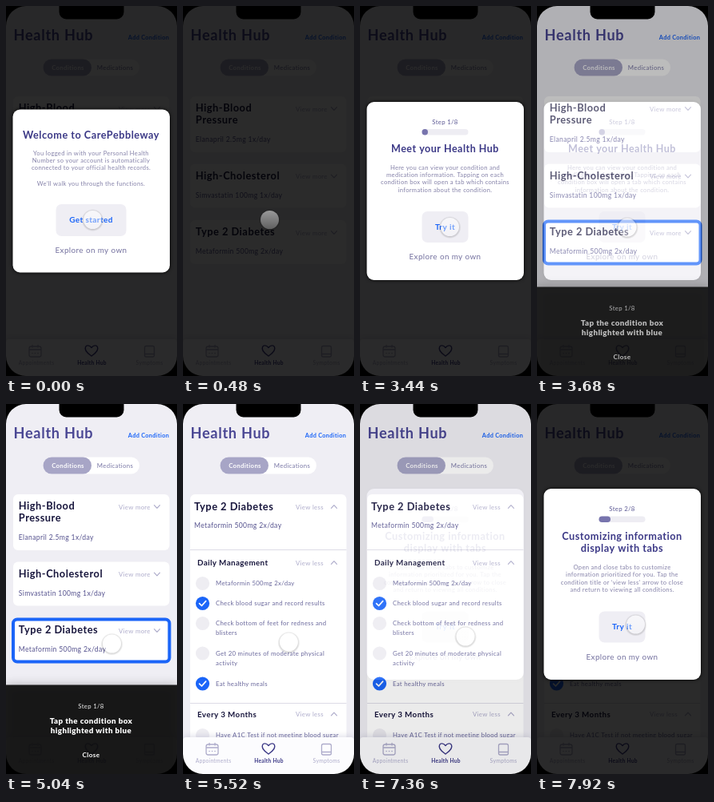
Animation of 214x463 px, one loop 8000 ms. Source, as an HTML page with a canvas:

```html
<!DOCTYPE html>
<html lang="en">
<head>
<meta charset="utf-8">
<title>Health Hub walkthrough</title>
<style>
html, body { margin: 0; width: 100%; height: 100%; overflow: hidden; background: #000; }
canvas { display: block; width: 214px; height: 463px; }
</style>
</head>
<body>
<canvas id="stage"></canvas>
<script>
const W = 214, H = 463, LOOP = 8000;
const ratio = window.devicePixelRatio || 1;
const INK = '#3b3886', NAVY = '#17153c', SOFT = '#8582a9', LILAC = '#aeaccb';
const DOSE = '#56538f', BLUE = '#1b65f8';
let g;

function setUp(canvas) {
  canvas.width = W * ratio;
  canvas.height = H * ratio;
  const c = canvas.getContext('2d');
  c.scale(ratio, ratio);
  return c;
}

function box(x, y, w, h, r, fill) {
  g.beginPath();
  g.roundRect(x, y, w, h, r);
  g.fillStyle = fill;
  g.fill();
}

function shadowed(blur, color, draw) {
  g.save();
  g.shadowColor = color;
  g.shadowBlur = blur * ratio;
  draw();
  g.restore();
}

function disc(x, y, r, fill) {
  g.beginPath();
  g.arc(x, y, r, 0, Math.PI * 2);
  g.fillStyle = fill;
  g.fill();
}

function line(points, color, width) {
  g.beginPath();
  points.forEach(([x, y]) => g.lineTo(x, y));
  g.strokeStyle = color;
  g.lineWidth = width;
  g.lineCap = g.lineJoin = 'round';
  g.stroke();
}

function text(str, x, y, size, color, weight = 400, align = 'left') {
  g.font = `${weight} ${size}px Lato, sans-serif`;
  g.letterSpacing = size * 0.04 + 'px';
  g.textAlign = align;
  g.fillStyle = color;
  g.fillText(str, x, y);
}

const centred = (str, y, size, color, weight) => text(str, 106.5, y, size, color, weight, 'center');

function toggleLink(label, y, up) {
  text(label, 141, y, 7.8, LILAC);
  const d = up ? -1.8 : 1.8;
  line([[185.5, y - 3 - d], [189, y - 3 + d], [192.5, y - 3 - d]], LILAC, 1.2);
}

// Screens

function header() {
  g.fillStyle = '#efeef4';
  g.fillRect(0, 0, W, H);
  text('Health Hub', 9.5, 42.5, 18.1, '#4a4794', 700);
  text('Add Condition', 152.8, 42, 7.4, BLUE, 700);
  box(46.5, 66.5, 120.5, 21, 10.5, '#fff');
  box(46.5, 66.5, 60.5, 21, 10.5, '#a7a5c6');
  text('Conditions', 77.5, 80, 7.8, '#fff', 700, 'center');
  text('Medications', 136.5, 80, 7.8, '#7977a5', 400, 'center');
}

function tabBar() {
  shadowed(10, 'rgba(60,58,110,.22)', () => box(0, 417, W, 50, 4, '#fcfcfe'));
  g.strokeStyle = LILAC;
  g.lineWidth = 1.3;
  g.beginPath();
  g.roundRect(29, 426, 15, 13, 2.5);
  g.moveTo(29, 430); g.lineTo(44, 430);
  g.moveTo(33, 424.5); g.lineTo(33, 427);
  g.moveTo(40, 424.5); g.lineTo(40, 427);
  g.roundRect(173.5, 425.5, 12, 13.5, 2);
  g.moveTo(174, 435.5); g.lineTo(185, 435.5);
  g.stroke();
  for (const x of [33, 36.5, 40]) disc(x, 434.5, 0.8, LILAC);

  g.strokeStyle = INK;
  g.lineWidth = 1.4;
  g.beginPath();
  g.moveTo(107, 438);
  g.bezierCurveTo(93, 429, 101, 420.5, 107, 427.5);
  g.bezierCurveTo(113, 420.5, 121, 429, 107, 438);
  g.stroke();
  text('Appointments', 38, 449, 6.7, LILAC, 400, 'center');
  text('Health Hub', 107.5, 449, 6.6, INK, 700, 'center');
  text('Symptoms', 179.5, 449, 6.9, LILAC, 400, 'center');
}

function conditionCard(y, h, title, dose) {
  box(9, y, 195.5, h, 6, '#fff');
  title.forEach((row, i) => text(row, 15.8, y + 19 + i * 15, 12.8, NAVY, 700));
  text(dose, 15.8, y + h - 13, 8.6, DOSE);
  toggleLink('View more', y + 18.5, false);
}

function conditionList() {
  header();
  conditionCard(113, 70, ['High-Blood', 'Pressure'], 'Elanapril 2.5mg 1x/day');
  conditionCard(197.5, 55, ['High-Cholesterol'], 'Simvastatin 100mg 1x/day');
  conditionCard(268, 55, ['Type 2 Diabetes'], 'Metaformin 500mg 2x/day');
  tabBar();
}

function task() {
  conditionList();
  g.strokeStyle = BLUE;
  g.lineWidth = 4;
  g.beginPath();
  g.roundRect(9, 269.5, 195.5, 53, 5);
  g.stroke();
  shadowed(12, 'rgba(0,0,0,.3)', () => {
    g.fillStyle = 'rgba(14,14,14,.94)';
    g.fillRect(0, 351.5, W, H);
  });
  centred('Step 1/8', 381, 7.8, '#eee');
  centred('Tap the condition box', 399.5, 9.8, '#fff', 900);
  centred('highlighted with blue', 411.5, 9.8, '#fff', 900);
  centred('Close', 441.5, 8.2, '#fff', 700);
}

function todo(y, rows, done) {
  disc(24.5, y, 8.6, done ? BLUE : '#eeedf2');
  if (done) line([[20.5, y + 0.2], [23.4, y + 3], [28.6, y - 2.9]], '#fff', 1.7);
  rows.forEach((row, i) => text(row, 41, y + 2.5 + i * 12, 7.75, '#6a689c'));
}

function expanded() {
  header();
  box(9, 113, 195.5, 320, 6, '#fff');
  text('Type 2 Diabetes', 14, 132.5, 12.8, NAVY, 700);
  toggleLink('View less', 131.5, true);
  text('Metaformin 500mg 2x/day', 14, 154.5, 8.6, DOSE);
  for (const y of [182, 374]) {
    g.fillStyle = '#dddce6';
    g.fillRect(9, y, 195.5, 1);
  }
  text('Daily Management', 18, 202, 9.8, NAVY, 700);
  toggleLink('View less', 201.5, true);
  todo(224.5, ['Metaformin 500mg 2x/day']);
  todo(249.5, ['Check blood sugar and record results'], true);
  todo(274.5, ['Check bottom of feet for redness and', 'blisters']);
  todo(312, ['Get 20 minutes of moderate physical', 'activity']);
  todo(350, ['Eat healthy meals'], true);
  text('Every 3 Months', 18, 391.5, 9.8, NAVY, 700);
  toggleLink('View less', 391, true);
  todo(414.5, ['Have A1C Test if not meeting blood sugar']);
  tabBar();
}

function dim(screen) {
  screen();
  g.fillStyle = 'rgba(0,0,0,.83)';
  g.fillRect(0, 0, W, H);
}

function modal(top, bottom, button) {
  shadowed(4, '#000', () => box(8.5, top, 196.5, bottom - top, 9, '#fff'));
  const { w, y, h, label } = button;
  box(106.5 - w / 2, y, w, h, 7, '#efeef4');
  centred(label, y + h / 2 + 3.4, 10, BLUE, 700);
  centred('Explore on my own', y + h + 21.3, 9.9, '#74719f');
}

function body(rows, y) {
  rows.forEach((row, i) => centred(row, y + i * 9.4, 7.6, SOFT));
}

function progress(step, y, filled) {
  centred(step, y - 6.3, 7.8, '#5c5994');
  box(77.5, y, 58, 7.5, 3.75, '#eeedf3');
  box(77.5, y, filled, 7.5, 3.75, '#7774ad');
}

function welcome() {
  dim(conditionList);
  modal(129.5, 333.5, { w: 88, y: 248, h: 40, label: 'Get started' });
  centred('Welcome to CarePebbleway', 165.5, 12.7, INK, 700);
  body(['You logged in with your Personal Health', 'Number so your account is automatically',
    'connected to your official health records.'], 186.5);
  body(['We’ll walk you through the functions.'], 224.5);
}

function meet() {
  dim(conditionList);
  modal(120, 343, { w: 58, y: 257, h: 39, label: 'Try it' });
  progress('Step 1/8', 154, 7.5);
  centred('Meet your Health Hub', 183, 12.5, INK, 700);
  body(['Here you can view your condition and', 'medication information. Tapping on each',
    'condition box will open a tab which contains', 'information about the condition.'], 204.5);
}

function tabs() {
  dim(expanded);
  modal(106, 345, { w: 58, y: 259.5, h: 39, label: 'Try it' });
  progress('Step 2/8', 140.5, 14.5);
  centred('Customizing information', 169.5, 12.7, INK, 700);
  centred('display with tabs', 184.5, 12.7, INK, 700);
  body(['Open and close tabs to customize', 'information prioritized for you. Tap the',
    'condition title or ‘view less’ arrow to close', 'and return to viewing all conditions.'], 207);
}

function bezel() {
  g.fillStyle = '#000';
  g.beginPath();
  g.rect(0, 0, W, H);
  g.roundRect(0, 0, W, H, 25);
  g.fill('evenodd');
  box(66.5, -12, 81, 28.5, 9, '#000');
}

// Timeline

function render(draw) {
  const canvas = document.createElement('canvas');
  g = setUp(canvas);
  draw();
  return canvas;
}

const scenes = [
  { start: -1, length: 1, draw: welcome },
  { start: 80, length: 340, draw: () => dim(conditionList) },
  { start: 1000, length: 520, draw: meet },
  { start: 3470, length: 480, draw: task },
  { start: 5070, length: 220, draw: expanded },
  { start: 7340, length: 460, draw: tabs }
].map(s => ({ ...s, image: render(s.draw) }));

// Touch stops: time, x, y
const stops = [
  [0, 108.5, 267.5], [960, 108.5, 267.5], [1400, 106.5, 268.5], [1840, 106.5, 268.5],
  [2560, 112.5, 276.5], [3600, 112.5, 276.5], [4480, 132.5, 300], [5280, 132.5, 300],
  [6100, 132, 291], [7400, 132, 291], [7880, 123.5, 276], [LOOP, 123.5, 276]
];

const clamp = v => Math.min(1, Math.max(0, v));
const smooth = v => v * v * (3 - 2 * v);
const easeOut = v => 1 - (1 - v) ** 2;

function touchAt(t) {
  const i = stops.findIndex(s => s[0] > t);
  const [t0, x0, y0] = stops[i - 1], [t1, x1, y1] = stops[i];
  const k = smooth((t - t0) / (t1 - t0));
  return [x0 + (x1 - x0) * k, y0 + (y1 - y0) * k];
}

function touch(x, y) {
  const shade = g.createRadialGradient(x, y + 0.6, 10.5, x, y + 0.6, 14);
  shade.addColorStop(0, 'rgba(0,0,0,.22)');
  shade.addColorStop(1, 'rgba(0,0,0,0)');
  g.beginPath();
  g.arc(x, y + 0.6, 14, 0, Math.PI * 2);
  g.arc(x, y, 11.5, 0, Math.PI * 2, true);
  g.fillStyle = shade;
  g.fill();
  const glass = g.createLinearGradient(0, y - 11, 0, y + 11);
  glass.addColorStop(0, 'rgba(255,255,255,.52)');
  glass.addColorStop(1, 'rgba(255,255,255,.26)');
  disc(x, y, 11.5, glass);
}

const stage = setUp(document.getElementById('stage'));
const origin = performance.now();

function frame() {
  const t = (performance.now() - origin) % LOOP;
  g = stage;
  for (const { start, length, image } of scenes) {
    g.globalAlpha = easeOut(clamp((t - start) / length));
    if (g.globalAlpha > 0) g.drawImage(image, 0, 0, W, H);
  }
  g.globalAlpha = 1;
  touch(...touchAt(t));
  bezel();
  requestAnimationFrame(frame);
}

frame();
</script>
</body>
</html>
```
